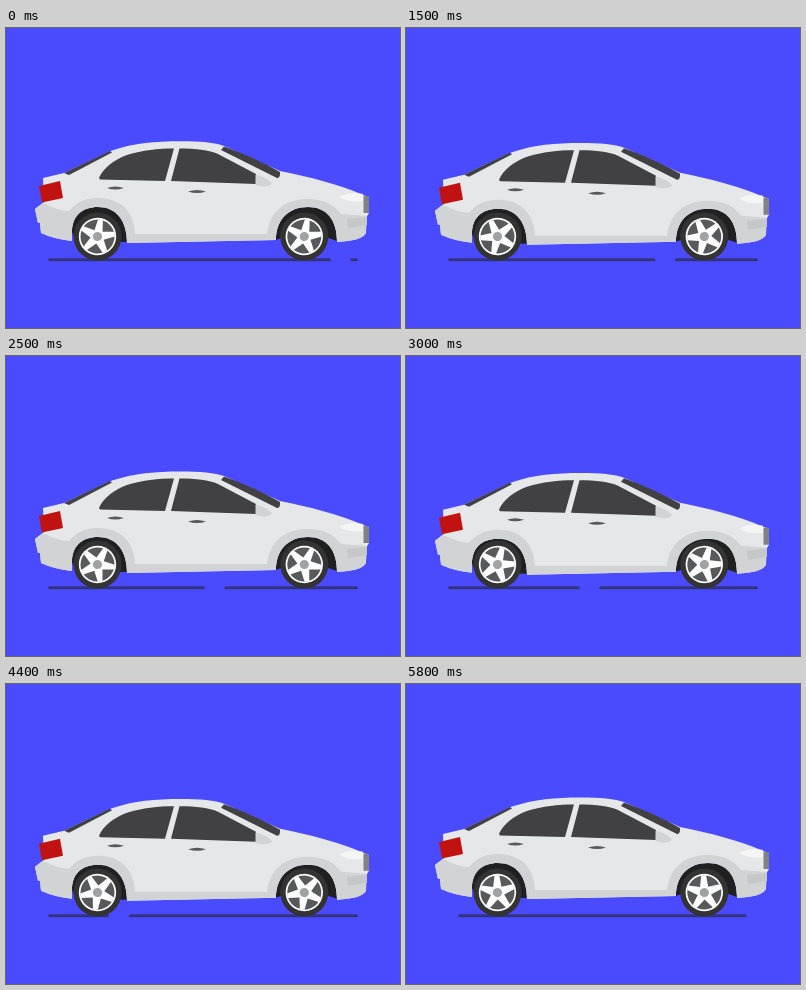
Animation, 394 px wide and 300 px high, one loop 5900 ms. Source, as an HTML page:

```html
<!DOCTYPE html>
<html lang="en">
<head>
<meta charset="utf-8">
<title>Driving car</title>
<style>
  html, body { margin: 0; width: 100%; height: 100%; overflow: hidden; background: #4a4aff; }
  svg { display: block; width: 100%; height: 100%; }
</style>
</head>
<body>
<svg viewBox="0 0 394 300">
  <defs>
    <g id="wheel">
      <circle r="18.7" fill="#fff"/>
      <circle r="17" fill="#58595b"/>
      <path id="star" fill="#fff"/>
      <circle r="4.6" fill="#a0a2a5"/>
    </g>
  </defs>
  <path id="road" fill="none" stroke="#34347c" stroke-width="3" stroke-linecap="round"/>
  <g id="car">
    <path fill="#202020" d="M66 204C66 188 76 179 92 179C110 179 121 192 121 214L70 213ZM270 212C270 192 282 179 302 179C321 179 331 191 331 213L322 210H275Z"/>
    <path fill="#e6e7e8" d="M37 150L58 145L106 122.500C128 115 150 113.300 174 113.300C194 113.300 209 114.500 218 118L274 143C303 149 333 156 357 167L363 169V185L360 190L360 205C357 211 346 213 331 214C331 192 321 179 302 179C282 179 270 192 270 212L121 215C121 192 110 179 92 179C76 179 66 188 66 204V213Q48 211 35 205L34 195H32L29 181L38 174Z"/>
    <path fill="#d1d3d4" d="M29 181L37 175Q52 183 63 183Q74 170 92 170C115 170 128 184 129 206H261C264 183 279 171 302 171Q324 171 335 186L361 188L360 205C357 211 346 213 331 214C331 192 321 179 302 179C282 179 270 192 270 212L121 215C121 192 110 179 92 179C76 179 66 188 66 204V213Q48 211 35 205L34 195H32Z"/>
    <path fill="#c5c7c9" d="M341 191L361 189V197L342 200Z"/>
    <path fill="#414042" d="M93 150C97 140 109 131 121 127C137 122 152 120.500 168 120.500L159 153L94 151.500ZM173.500 120.500C190 120.500 203 122 212 126L250 146V156L165 153ZM58 145L104 123L106 124.500L63 147ZM218 118.500Q250 130 274 144Q274.500 150 271 150L215 122Z"/>
    <path fill="#d1d3d4" d="M249.500 146.500Q260 149 266 155Q264 159 256 158.500L249.500 157Z"/>
    <path fill="#58595b" d="M101 160Q109 157 118 160Q109 163 101 160ZM182 163.500Q191 160.500 200 163.500Q191 166.500 182 163.500Z"/>
    <path fill="#c11212" d="M33 158L54 153L57 170L36 174.500Z"/>
    <path fill="#f5f5f6" d="M333 169Q343 163 357 166V173Q344 175 333 169Z"/>
    <path fill="#808184" d="M357.500 168H362Q363 168 363 170V185H357.500Z"/>
  </g>
  <g fill="#333"><circle cx="91.500" cy="208.500" r="24"/><circle cx="298.300" cy="208.500" r="24"/></g>
  <use class="rim" href="#wheel" data-x="91.500"/>
  <use class="rim" href="#wheel" data-x="298.300"/>
</svg>
<script>
  const LOOP = 5.9, BOUNCES = 3, TURNS = 2;
  const ROAD = { left: 42, right: 352, y: 231.7, gap: 19.5, period: 308, speed: 50.4 };
  const $ = id => document.getElementById(id);
  const rims = document.querySelectorAll('.rim');

  const polar = (r, deg) => {
    const a = deg * Math.PI / 180;
    return (r * Math.sin(a)).toFixed(2) + ' ' + (-r * Math.cos(a)).toFixed(2);
  };
  const points = [];
  for (let a = 0; a < 360; a += 72)
    points.push(polar(17.3, a - 8), polar(17.3, a + 8), polar(7, a + 36));
  $('star').setAttribute('d', 'M' + points.join('L') + 'Z');

  // The gap slides left; dashes are clipped to the ends of the road.
  function roadPath(t) {
    const gapStart = 325 - ROAD.speed * t;
    let d = '';
    for (let k = -1; k < 2; k++) {
      const end = gapStart + k * ROAD.period + ROAD.period;
      const start = end - ROAD.period + ROAD.gap;
      const a = Math.max(ROAD.left, start) + 1.5;
      const b = Math.min(ROAD.right, end) - 1.5;
      if (b > a) d += `M${a} ${ROAD.y}H${b}`;
    }
    return d;
  }

  function draw(now) {
    const t = now / 1000 % LOOP, p = t / LOOP;
    const drop = 1.85 * (1 - Math.cos(2 * Math.PI * BOUNCES * p));
    $('car').setAttribute('transform', `translate(0 ${drop})`);
    $('road').setAttribute('d', roadPath(t));
    for (const rim of rims)
      rim.setAttribute('transform', `translate(${rim.dataset.x} 208.5) rotate(${10 + 360 * TURNS * p})`);
  }

  const began = performance.now();
  function tick() {
    draw(performance.now() - began);
    requestAnimationFrame(tick);
  }
  tick();
</script>
</body>
</html>
```
